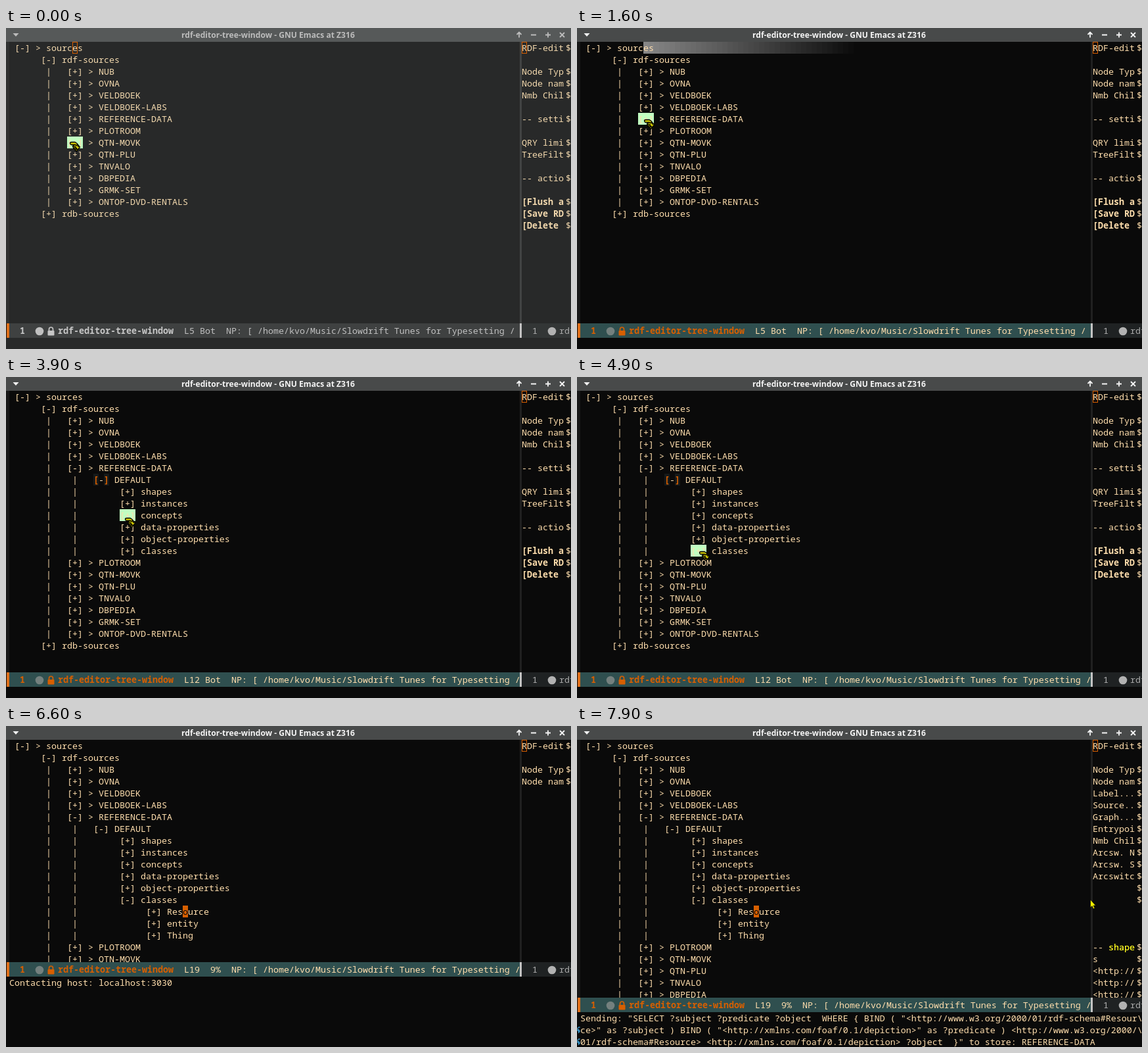
An HTML page that plays this animation: 860x488 px, repeating every 8 s.

```html
<!DOCTYPE html>
<html lang="en">
<head>
<meta charset="utf-8">
<title>Tree window</title>
<style>
html, body { margin: 0; width: 860px; height: 488px; overflow: hidden; background: #0a0a0a; }
svg { display: block; }
text { font: 13.333px "Noto Sans Mono", "DejaVu Sans Mono", monospace; white-space: pre; }
.b { font-weight: 700; }
.title { font: 700 12.1px "Noto Sans", "Open Sans", sans-serif; }
</style>
</head>
<body>
<svg id="stage" width="860" height="488" viewBox="0 0 860 488"></svg>
<script>
const STEP = 100, LOOP = 8000;
const CW = 8, LH = 18, LEFT = 5, TOP = 21, SPLIT = 782, ECHO_TOP = 471, BAR_H = 22;
const ORANGE = '#d75f00', GLOW = '#c1ffc1';
// Steps at which each click takes effect
const FOCUS = 16, OPEN_SOURCE = 18, OPEN_DEFAULT = 32, OPEN_CLASSES = 51, OPEN_RESOURCE = 65, REPLY = 67;

const SOURCES = ['NUB', 'OVNA', 'VELDBOEK', 'VELDBOEK-LABS', 'REFERENCE-DATA', 'PLOTROOM',
  'QTN-MOVK', 'QTN-PLU', 'TNVALO', 'DBPEDIA', 'GRMK-SET', 'ONTOP-DVD-RENTALS'];
const KINDS = ['shapes', 'instances', 'concepts', 'data-properties', 'object-properties', 'classes'];
const CLASSES = ['Resource', 'entity', 'Thing'];
const MUSIC = '/home/kvo/Music/Slowdrift Tunes for Typesetting /';
const CONTACT = ['Contacting host: localhost:3030'];
const SENDING = [
  'Sending: "SELECT ?subject ?predicate ?object  WHERE { BIND ( "<http://www.w3.org/2000/01/rdf-schema#Resour\\',
  'ce>" as ?subject ) BIND ( "<http://xmlns.com/foaf/0.1/depiction>" as ?predicate ) <http://www.w3.org/2000/\\',
  '01/rdf-schema#Resource> <http://xmlns.com/foaf/0.1/depiction> ?object  }" to store: REFERENCE-DATA'];
const SETTINGS = ['RDF-edit', '', 'Node Typ', 'Node nam', 'Nmb Chil', '', '-- setti', '', 'QRY limi',
  'TreeFilt', '', '-- actio', '', '[Flush a', '[Save RD', '[Delete '];
const DETAILS = ['RDF-edit', '', 'Node Typ', 'Node nam', 'Label...', 'Source..', 'Graph...', 'Entrypoi',
  'Nmb Chil', 'Arcsw. N', 'Arcsw. S', 'Arcswitc', ' ', ' ', '', '', '', '-- shape', 's',
  '<http://', '<http://', '<http://'];

const MOVES = [
  { from: 2, to: 6, x: 96, y: 196 },
  { from: 6, to: 11, x: 95, y: 139 },
  { from: 12, to: 14, x: 102, y: 139 },
  { from: 20, to: 24, x: 146, y: 168 },
  { from: 24, to: 26, x: 140, y: 156 },
  { from: 34, to: 39, x: 181, y: 214 },
  { from: 39, to: 43, x: 187, y: 259 },
  { from: 45, to: 49, x: 186, y: 265 },
  { from: 53, to: 56, x: 269, y: 285 },
  { from: 56, to: 58, x: 272, y: 284 },
  { from: 72, to: 79, x: 781, y: 264 }];
const CLICKS = [
  { step: 0, row: 0, col: 12, echo: [] },
  { step: OPEN_SOURCE, row: 6, col: 12, echo: CONTACT },
  { step: OPEN_DEFAULT, row: 7, col: 16, echo: [] },
  { step: OPEN_CLASSES, row: 13, col: 22, echo: CONTACT },
  { step: OPEN_RESOURCE, row: 14, col: 33, echo: CONTACT }];

const within = (s, a, b) => s >= a && s < b;
const esc = t => t.replace(/&/g, '&amp;').replace(/</g, '&lt;').replace(/>/g, '&gt;');
const rect = (x, y, w, h, fill, more = '') =>
  `<rect x="${x}" y="${y}" width="${w}" height="${h}" fill="${fill}" ${more}/>`;
const text = (x, y, t, fill, cls = '') =>
  t ? `<text x="${x}" y="${y}" fill="${fill}" class="${cls}">${esc(t)}</text>` : '';
const dot = (x, y, fill) => `<circle cx="${x}" cy="${y}" r="6.3" fill="${fill}"/>`;
const path = (d, fill, stroke, width = 1) =>
  `<path d="${d}" fill="${fill}" stroke="${stroke}" stroke-width="${width}"/>`;
const frame = col => rect(LEFT + col * CW + .5, TOP + .5, 7, 17, 'none', `stroke="${ORANGE}"`);
const colX = c => LEFT + c * CW;
const rowY = r => TOP + r * LH;

function pointerAt(s) {
  let x = 97, y = 173;
  for (const m of MOVES) {
    const k = Math.min(1, Math.max(0, (s - m.from) / (m.to - m.from)));
    const e = k * k * (3 - 2 * k);
    x += (m.x - x) * e;
    y += (m.y - y) * e;
  }
  return [Math.round(x), Math.round(y)];
}

function tree(s) {
  const box = open => open ? '[-]' : '[+]';
  const bars = '       |    |';
  const lines = [' [-] > sources', '      [-] rdf-sources'];
  for (const name of SOURCES) {
    const open = name === 'REFERENCE-DATA' && s >= OPEN_SOURCE;
    lines.push(`       |   ${box(open)} > ${name}`);
    if (!open) continue;
    lines.push(`${bars}   ${box(s >= OPEN_DEFAULT)} DEFAULT`);
    if (s < OPEN_DEFAULT) continue;
    const deep = s >= OPEN_CLASSES;
    for (const kind of KINDS) lines.push(`${bars}        ${box(deep && kind === 'classes')} ${kind}`);
    if (deep) for (const c of CLASSES) lines.push(`${bars}             [+] ${c}`);
  }
  lines.push('      [+] rdb-sources');
  return lines;
}

// The button or label under the pointer
function hover(lines, x, y) {
  const row = Math.floor((y + 1 - TOP) / LH), col = Math.floor((x - LEFT) / CW);
  for (const m of (lines[row] || '').matchAll(/\[.\]|[\w-]+$/g))
    if (col >= m.index && col < m.index + m[0].length) return { row, col: m.index, label: m[0] };
}

function titleBar(active) {
  const ink = active ? '#f4f4f4' : '#bcbcbc';
  return rect(0, 0, 860, TOP, active ? '#484a4a' : '#565959') +
    text(267, 15, 'rdf-editor-tree-window - GNU Emacs at Z316', ink, 'title') +
    path('M10.5 8h9l-4.5 5z', ink, 'none') +
    path('M781 14.5V7M777.5 10l3.5-3.5 3.5 3.5M799 10.5h8M821 10.5h8M825 6.5v8M843 7l7 7M850 7l-7 7',
      'none', ink, 1.8);
}

// Fading trail of cells behind the cursor after the window gains focus
function beacon(s) {
  const count = within(s, FOCUS, OPEN_SOURCE) ? 40 - 20 * (s - FOCUS) : 0;
  let out = '';
  for (let i = 0; i < count; i++) {
    const v = Math.round(10 + 3.1 * (count - i));
    out += rect(colX(12 + i), TOP, CW, LH, `rgb(${v},${v},${v})`);
  }
  return out;
}

function modeLine(s, line, y, active) {
  const base = y + 16, ink = active ? ORANGE : '#c6c6c6', soft = active ? '#ffdead' : '#c0c0c0';
  const place = `L${5 + line}${s < OPEN_CLASSES ? ' Bot' : '  9%'}`;
  return rect(0, y, 860, BAR_H, active ? '#2f4f4f' : '#3f4141') + rect(0, y, 1, BAR_H, '#101010') +
    rect(1, y, 4, BAR_H, '#e0701a') + text(21, base, '1', ink, 'b') +
    dot(51, y + 12, active ? '#74807e' : '#c0c0c0') +
    rect(63.5, y + 11, 10, 7.5, ink, 'rx="1"') +
    path(`M65.5 ${y + 11}v-2a3 3 0 0 1 6 0v2`, 'none', ink, 1.7) +
    text(79, base, 'rdf-editor-tree-window', ink, 'b') +
    text(271, base, `${place}  NP: [ ${MUSIC}`, soft) +
    rect(SPLIT, y, 78, BAR_H, active ? '#1f2223' : '#333636') + rect(SPLIT, y, 3, BAR_H, '#c4c4c4') +
    text(801, base, '1', '#b2b2b2') + dot(831, y + 12, '#b2b2b2') + text(842, base, 'rdf', '#a8a8a8');
}

function sidePane(s, bg, ink, active) {
  const lines = s < OPEN_RESOURCE ? SETTINGS : DETAILS.slice(0, Math.max(4, 6 * (s - REPLY + 1)));
  let out = rect(SPLIT, TOP, 78, 467, bg) + rect(SPLIT, TOP, 3, 467, active ? '#202020' : '#424444');
  lines.forEach((line, r) => {
    if (!line) return;
    const y = rowY(r) + 14;
    out += text(785, y, line, ink, line[0] === '[' ? 'b' : '') + text(852, y, '$', ink);
    if (line.endsWith('shape')) out += text(809, y, 'shape', '#ffff00');
  });
  return out + frame(97.5);
}

function echoArea(lines, top, ink) {
  return lines.map((line, i) => {
    const y = top + i * LH;
    const wrap = i ? path(`M4.5 ${y + 5}H2.5Q.5 ${y + 6} 1 ${y + 10}H4.5M2.5 ${y + 8}v5l2-2`, 'none', '#3a9ad0', 1.3) : '';
    return text(LEFT, y + 14, line, ink) + wrap;
  }).join('');
}

function pointer(x, y, hand) {
  const shape = hand
    ? path('M.5 1.5Q1 .5 3 .5H8L11 2.5 15.5 8 10.5 14.5 7.5 12 5.5 9.5 4.5 6.5 7 4.5H2Q.5 4 .5 1.5Z', '#d2ca00', '#000', 1.3) +
      path('M7 4.500L11 5.500M5 7l5 1M6 9.500l5 .5M8 12l4-1M11 4l2.500 4', 'none', '#000', 1.3)
    : path('M.5 0V12L3 9.5 5 14 7 13 5 9H8.5Z', '#f4f000', '#000', .6);
  return `<g transform="translate(${x} ${y})">${shape}</g>`;
}

function scene(s) {
  const active = s >= FOCUS, bg = active ? '#0a0a0a' : '#282929', ink = active ? '#ffdead' : '#f3d9ae';
  const lines = tree(s), [px, py] = pointerAt(s);
  const click = CLICKS.filter(c => c.step <= s).pop(), age = s - click.step;
  const echo = s < REPLY ? click.echo : SENDING;
  const echoRows = within(s, OPEN_RESOURCE, REPLY) ? 6 : Math.max(1, echo.length);
  const echoTop = ECHO_TOP - (echoRows - 1) * LH;
  const hidden = within(s, OPEN_RESOURCE, 72);
  const still = s >= OPEN_SOURCE && age < 3;
  const lit = age < 7 || Math.floor((age - 7) / 5) % 2;
  const hit = hover(lines, px, py);
  const cell = (row, col, str, fill, back, cls) =>
    rect(colX(col), rowY(row), str.length * CW, LH, back) + text(colX(col), rowY(row) + 14, str, fill, cls);

  let out = rect(0, 0, 860, 488, bg) + rect(0, TOP, LEFT, 467, active ? '#171717' : '#303232') + beacon(s);
  lines.forEach((line, r) => out += text(LEFT, rowY(r) + 14, line, ink));
  if (within(s, OPEN_DEFAULT, OPEN_CLASSES + 3))
    out += cell(7, 16, '[', ORANGE, '#161a1a', 'b') + cell(7, 18, ']', ORANGE, '#161a1a', 'b');
  if (hit && !still && !hidden) out += cell(hit.row, hit.col, hit.label, '#ffdead', GLOW);
  if (!active) out += frame(12);
  else if (click.step && lit) out += cell(click.row, click.col, lines[click.row][click.col], '#0a0a0a', ORANGE);

  out += sidePane(s, bg, ink, active) + rect(0, echoTop, 860, 488, bg) +
    modeLine(s, click.row, echoTop - BAR_H, active) + echoArea(echo, echoTop, ink) + titleBar(active);
  return hidden ? out : out + pointer(px, py, still || !!hit);
}

const stage = document.getElementById('stage');
const start = performance.now();
let shown = -1;
function tick() {
  const s = Math.floor(((performance.now() - start) % LOOP) / STEP);
  if (s !== shown) stage.innerHTML = scene(shown = s);
  requestAnimationFrame(tick);
}
tick();
</script>
</body>
</html>
```
